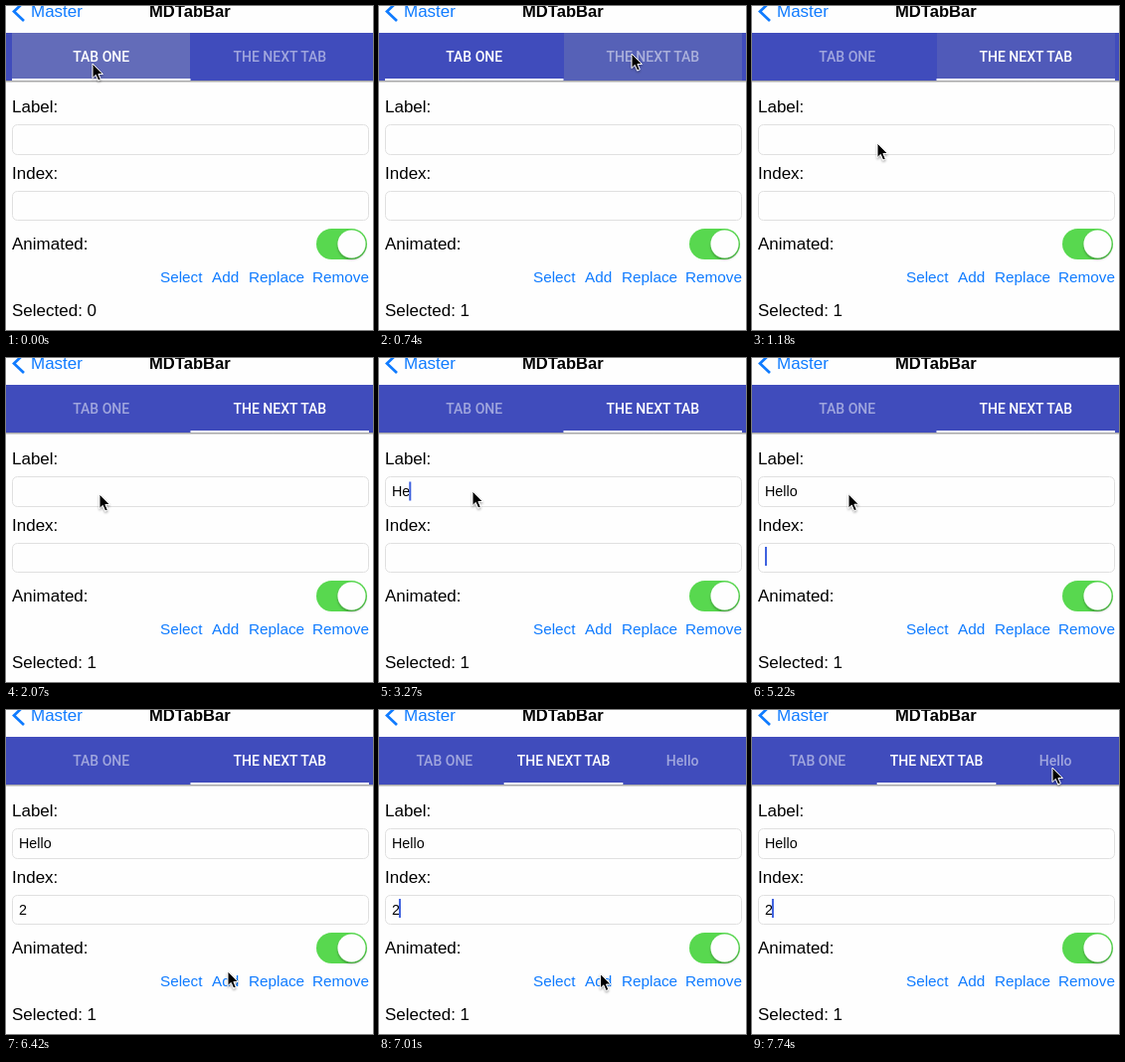
An HTML page that plays this animation: 369 px wide and 326 px high, repeating every 8000 ms.

```html
<!DOCTYPE html>
<html lang="en">
<head>
<meta charset="utf-8">
<title>Tab bar demo</title>
<style>
  html, body { margin: 0; width: 100%; height: 100%; overflow: hidden; background: #fefefe; }
  svg { display: block; width: 100%; height: 100%; }
  text { font: 17px "Liberation Sans", Arial, sans-serif; fill: #000; white-space: pre; }
  .blue, .buttons text { fill: #0f7bff; }
  .title { font-size: 16.6px; font-weight: bold; }
  .buttons text { font-size: 15.3px; }
  .input { font-size: 14.3px; }
  .tabs text { font: 500 14px Roboto, sans-serif; fill: #fff; text-anchor: middle; }
  .field { fill: #fefefe; stroke: #e0e0e0; }
</style>
</head>
<body>
<svg viewBox="0 0 369 326">
  <defs>
    <linearGradient id="shade" x2="0" y2="1">
      <stop stop-color="#000" stop-opacity=".5"/>
      <stop offset="1" stop-color="#000" stop-opacity="0"/>
    </linearGradient>
    <clipPath id="nextTab"><rect x="186" y="27" width="179" height="48"/></clipPath>
    <filter id="soft" x="-50%" y="-50%" width="200%" height="200%">
      <feDropShadow dx="0" dy="1.5" stdDeviation="1.3" flood-opacity=".35"/>
    </filter>
  </defs>

  <path d="M18-4 8 5.5 18 15" fill="none" stroke="#0f7bff" stroke-width="2.7"/>
  <text class="blue" x="25" y="11">Master</text>
  <text class="title" x="144" y="11">MDTabBar</text>

  <rect y="74.5" width="369" height="3" fill="url(#shade)"/>
  <rect y="27" width="369" height="48" fill="#404cbc"/>
  <rect id="oldTouch" x="6" y="27" width="179" height="48" fill="#b5b9b0"/>
  <g clip-path="url(#nextTab)"><circle id="ripple" cx="254" cy="50" fill="#b5b9a0"/></g>
  <rect id="indicator" y="73" height="2" fill="#fff"/>
  <g class="tabs">
    <text id="tab0" y="56">TAB ONE</text>
    <text id="tab1" y="56">THE NEXT TAB</text>
    <text id="tab2" y="56">Hello</text>
  </g>

  <text x="6" y="107">Label:</text>
  <rect class="field" x="6.5" y="119.5" width="358" height="30" rx="5"/>
  <text class="input" id="label" x="13" y="139"></text>
  <text x="6" y="174">Index:</text>
  <rect class="field" x="6.5" y="186.5" width="358" height="29" rx="5"/>
  <text class="input" id="index" x="13" y="206"></text>
  <rect id="caret" width="2" height="19" fill="#3f62df"/>

  <text x="6" y="245">Animated:</text>
  <rect x="312" y="224" width="51" height="31" rx="15.5" fill="#58d84f"/>
  <circle cx="347.5" cy="239.5" r="14" fill="#fefefe" filter="url(#soft)"/>
  <g class="buttons">
    <text x="155" y="278">Select</text>
    <text id="add" x="207" y="278">Add</text>
    <text x="244" y="278">Replace</text>
    <text x="308" y="278">Remove</text>
  </g>
  <text id="selected" x="6" y="312"></text>

  <path id="pointer" d="M0 0V14.5L3.3 11.4 5.7 17 8.3 15.9 5.9 10.5H10.4Z"
        fill="#000" stroke="#fff" stroke-width="1" filter="url(#soft)"/>
</svg>
<script>
const LOOP = 8000, STEP = 149, LAST_STEP = 52;
const LEFT = 6, BAR_WIDTH = 359;
const el = {};
document.querySelectorAll('[id]').forEach(node => el[node.id] = node);

const set = (node, attrs) => {
  for (const name in attrs) node.setAttribute(name, attrs[name]);
};
const ramp = (t, from, to) => Math.min(1, Math.max(0, (t - from) / (to - from)));
const ease = x => x * x * (3 - 2 * x);
const mix = (a, b, x) => a + (b - a) * x;
const within = (t, ranges) => ranges.some(([from, to]) => t >= from && t < to);

// Each stop: time, x, y
const pointerPath = [
  [0, 87, 58], [130, 87, 58], [590, 254, 48], [790, 254, 48],
  [1192, 126, 138], [1640, 94, 137], [2070, 94, 137], [2380, 94, 134],
  [4600, 94, 134], [4920, 97, 136], [5380, 97, 137], [5520, 101, 139],
  [6270, 222, 262], [6407, 223, 263], [6560, 222, 267],
  [6980, 222, 267], [7450, 301, 47], [7740, 302, 58]
];

function pointerAt(t) {
  const next = pointerPath.findIndex(stop => stop[0] > t);
  if (next < 0) return pointerPath.at(-1).slice(1);
  const a = pointerPath[next - 1], b = pointerPath[next];
  const x = ease(ramp(t, a[0], b[0]));
  return [mix(a[1], b[1], x), mix(a[2], b[2], x)];
}

function drawTabs(t) {
  const added = t >= 6700;
  const width = BAR_WIDTH / (added ? 3 : 2);
  const moved = ease(ramp(t, 760, 1090));
  const shrunk = ease(ramp(t, 6600, 6850));
  const barWidth = mix(BAR_WIDTH / 2, BAR_WIDTH / 3, shrunk);
  set(el.indicator, { x: LEFT + barWidth * moved, width: barWidth });

  const picked = ramp(t, 800, 1100);
  const opacity = [mix(1, .5, picked), mix(.5, 1, picked), added ? .5 : 0];
  opacity.forEach((value, i) =>
    set(el['tab' + i], { x: LEFT + width * (i + .5), 'fill-opacity': value }));

  set(el.oldTouch, { 'fill-opacity': .29 * (1 - ramp(t, 100, 590)) });
  set(el.ripple, {
    r: 120 * ease(ramp(t, 480, 720)),
    'fill-opacity': mix(.19, .13, ramp(t, 745, 1192)) * (1 - ramp(t, 1192, 1500))
  });
}

function drawFields(t) {
  const typed = Math.max(0, Math.floor((t - 3110) / STEP) + 1);
  el.label.textContent = 'Hello'.slice(0, typed);
  el.index.textContent = t >= 5500 ? '2' : '';

  const inIndex = t >= 4010;
  const active = inIndex ? el.index : el.label;
  const length = active.textContent ? active.getComputedTextLength() : 0;
  const hidden = within(t, [[0, 1470], [2070, 2370], [2670, 3100],
    [4610, 4910], [6000, 6550], [7140, 7500]]);
  set(el.caret, {
    x: 13 + Math.max(0, length - 1),
    y: inIndex ? 190 : 124.5,
    opacity: hidden ? 0 : 1
  });
}

function draw(now) {
  // The screen refreshes in coarse steps, like a low-rate capture
  const step = Math.min(LAST_STEP, Math.floor((now % LOOP + 20) / STEP));
  const t = step * STEP;
  drawTabs(t);
  drawFields(t);
  el.selected.textContent = 'Selected: ' + (t >= 700 ? 1 : 0);
  set(el.add, { 'fill-opacity': within(t, [[6500, 6650]]) ? .3 : 1 });
  set(el.pointer, { transform: `translate(${pointerAt(t)})` });
}

const start = performance.now();
function loop() {
  draw(performance.now() - start);
  requestAnimationFrame(loop);
}
loop();
</script>
</body>
</html>
```
